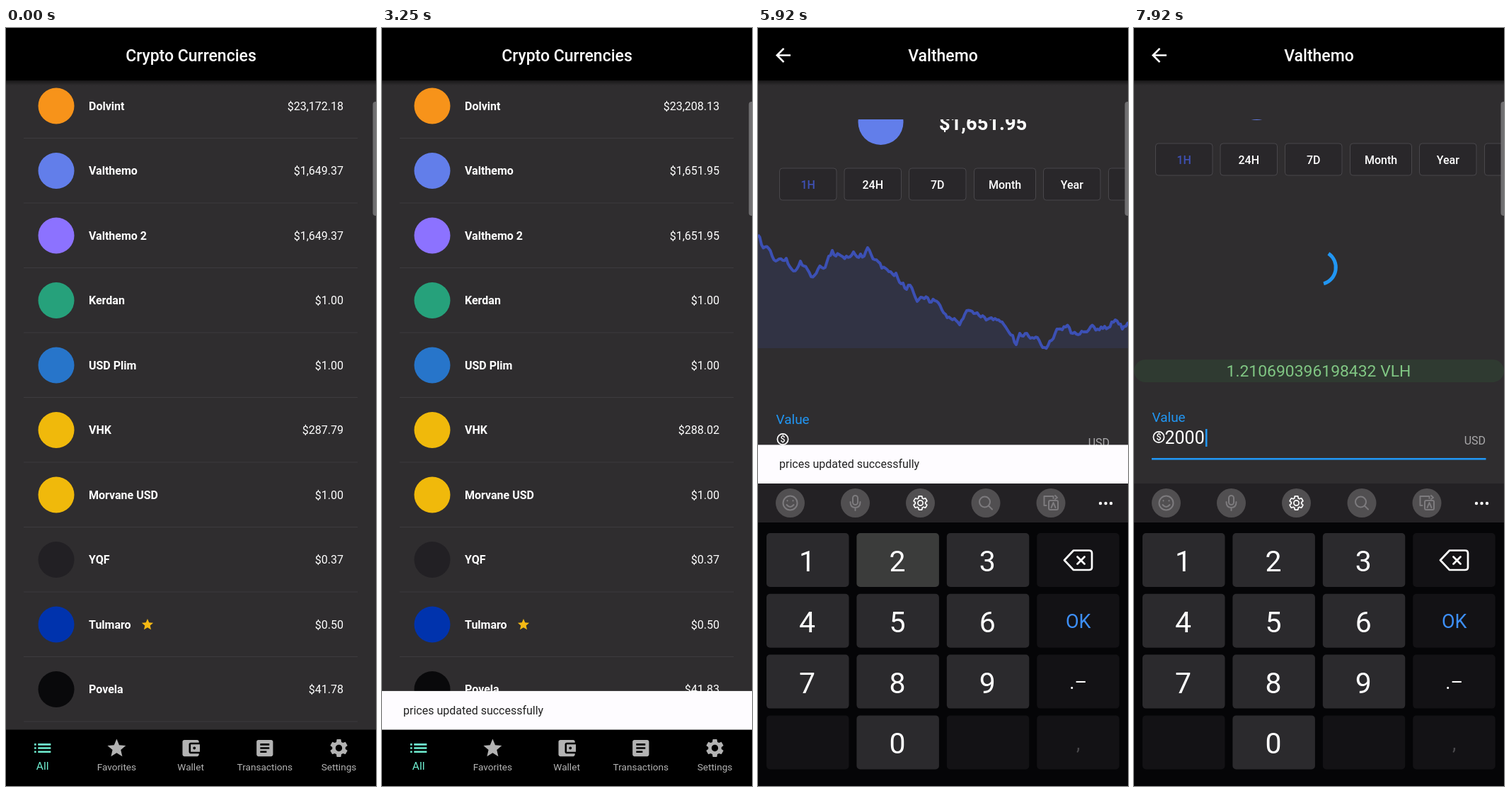
Recreate the animation shown at these times as an HTML page. Size 523 by 1070 pixels, loop 8000 ms.

```html
<!DOCTYPE html>
<html lang="en">
<head>
<meta charset="utf-8">
<title>Crypto Currencies</title>
<style>
html, body { margin: 0; width: 100%; height: 100%; overflow: hidden; background: #000; }
svg { display: block; }
#stage { width: 523px; height: 1070px; font-family: Roboto, sans-serif; }
.line { fill: none; stroke-width: 2; stroke-linecap: round; stroke-linejoin: round; }
</style>
</head>
<body>
<svg id="stage" viewBox="0 0 523 1070"></svg>
<script>
const LOOP = 8000;
const BG = '#2f2d2f', BLUE = '#2196f3';
const stage = document.getElementById('stage');

const coins = [
  ['Dolvint', '#f7931a', '$23,172.18', '$23,208.13'],
  ['Valthemo', '#627eea', '$1,649.37', '$1,651.95'],
  ['Valthemo 2', '#8c72ff', '$1,649.37', '$1,651.95'],
  ['Kerdan', '#26a17b', '$1.00', '$1.00'],
  ['USD Plim', '#2775ca', '$1.00', '$1.00'],
  ['VHK', '#f0b90b', '$287.79', '$288.02'],
  ['Morvane USD', '#f0b90b', '$1.00', '$1.00'],
  ['YQF', '#222024', '$0.37', '$0.37'],
  ['Tulmaro', '#0033ad', '$0.50', '$0.50'],
  ['Povela', '#09090b', '$41.78', '$41.83']
];

const icons = {
  list: 'M3 13h2v-2H3zm0 4h2v-2H3zm0-8h2V7H3zm4 4h14v-2H7zm0 4h14v-2H7zM7 7v2h14V7z',
  star: 'M12 17.27L18.18 21l-1.64-7.03L22 9.24l-7.19-.61L12 2 9.19 8.63 2 9.24l5.46 4.73L5.82 21z',
  wallet: 'M21 18v1c0 1.1-.9 2-2 2H5c-1.11 0-2-.9-2-2V5c0-1.1.89-2 2-2h14c1.1 0 2 .9 2 2v1h-9c-1.11 0-2 .9-2 2v8c0 1.1.89 2 2 2h9zm-9-2h10V8H12v8zm4-2.5c-.83 0-1.5-.67-1.5-1.5s.67-1.5 1.5-1.5 1.5.67 1.5 1.5-.67 1.5-1.5 1.5z',
  article: 'M19 3H5c-1.1 0-2 .9-2 2v14c0 1.1.9 2 2 2h14c1.1 0 2-.9 2-2V5c0-1.1-.9-2-2-2zm-5 14H7v-2h7v2zm3-4H7v-2h10v2zm0-4H7V7h10v2z',
  gear: 'M19.14 12.94c.04-.3.06-.61.06-.94 0-.32-.02-.64-.07-.94l2.03-1.58c.18-.14.23-.41.12-.61l-1.92-3.32c-.12-.22-.37-.29-.59-.22l-2.39.96c-.5-.38-1.03-.7-1.62-.94l-.36-2.54c-.04-.24-.24-.41-.48-.41h-3.84c-.24 0-.43.17-.47.41l-.36 2.54c-.59.24-1.13.57-1.62.94l-2.39-.96c-.22-.08-.47 0-.59.22L2.74 8.87c-.12.21-.08.47.12.61l2.03 1.58c-.05.3-.09.63-.09.94s.02.64.07.94l-2.03 1.58c-.18.14-.23.41-.12.61l1.92 3.32c.12.22.37.29.59.22l2.39-.96c.5.38 1.03.7 1.62.94l.36 2.54c.05.24.24.41.48.41h3.84c.24 0 .44-.17.47-.41l.36-2.54c.59-.24 1.13-.56 1.62-.94l2.39.96c.22.08.47 0 .59-.22l1.92-3.32c.12-.22.07-.47-.12-.61zM12 15.6c-1.98 0-3.6-1.62-3.6-3.6s1.62-3.6 3.6-3.6 3.6 1.62 3.6 3.6-1.62 3.6-3.6 3.6z',
  back: 'M20 11H7.83l5.59-5.59L12 4l-8 8 8 8 1.41-1.41L7.83 13H20z',
  check: 'M9 16.17L4.83 12l-1.42 1.41L9 19 21 7l-1.41-1.41z'
};

const text = (x, y, size, str, extra = '') =>
  `<text x="${x}" y="${y}" font-size="${size}" fill="#fff" ${extra}>${str}</text>`;
const rect = (x, y, w, h, fill, extra = '') =>
  `<rect x="${x}" y="${y}" width="${w}" height="${h}" fill="${fill}" ${extra}/>`;
const circle = (x, y, r, fill, extra = '') =>
  `<circle cx="${x}" cy="${y}" r="${r}" fill="${fill}" ${extra}/>`;
const icon = (name, x, y, size, fill, extra = '') =>
  `<path d="${icons[name]}" fill="${fill}" transform="translate(${x} ${y}) scale(${size / 24}) translate(-12 -12)" ${extra}/>`;
const MID = 'text-anchor="middle"', END = 'text-anchor="end"';

const header = title => rect(0, 74, 523, 7, 'url(#shade)') + rect(0, 0, 523, 74, '#000') +
  text(261.5, 47, 23, title, MID + ' font-weight="500"');

function listScreen() {
  const rows = coins.map(([name, color], i) => {
    const y = 110 + 91.5 * i;
    return circle(71, y, 25.5, color) + text(117, y + 5.5, 16, name, 'font-weight="700"') +
      text(477, y + 5.5, 16, '', END + ' class="price"') +
      rect(25, y + 45, 472, 1, '#3d3b3e');
  }).join('');
  const tabs = [['list', 'All'], ['star', 'Favorites'], ['wallet', 'Wallet'],
    ['article', 'Transactions'], ['gear', 'Settings']];
  const nav = tabs.map(([name, label], i) => {
    const x = 51.7 + 104.7 * i, color = i ? '#b3b3b3' : '#70f0d2';
    return icon(name, x, 1016.5, 31, color) +
      `<text x="${x}" y="${i ? 1047.5 : 1047}" font-size="${i ? 13.6 : 15.5}" fill="${color}" ${MID}>${label}</text>`;
  }).join('');
  return rect(0, 0, 523, 1070, BG) + rows + icon('star', 200, 842, 19.5, '#f5b914') +
    rect(25, 156, 472, 91, '#fff', 'id="ripple" opacity="0"') +
    `<g id="refresh">${circle(0, 0, 26.5, BG, 'filter="url(#soft)"')}
      <path id="refreshArc" fill="none" stroke="${BLUE}" stroke-width="3.4"/>
      <path id="refreshHead" d="M-6.5 0H6.5L0-8Z" fill="${BLUE}"/></g>` +
    header('Crypto Currencies') + `<g id="nav">${rect(0, 990.5, 523, 80, '#000')}${nav}</g>`;
}

// Price curve: one height every 5 px, with a small seeded jitter in between.
const heights = [320,334,337,339,350,357,354,356,353,365,371,368,357,364,369,379,377,368,366,366,350,
  342,350,348,351,350,351,344,351,347,350,338,348,355,358,367,367,372,375,374,387,388,397,391,402,414,
  408,410,409,415,413,416,426,432,436,440,441,447,438,427,427,431,430,436,436,439,437,438,440,443,450,
  458,462,475,459,463,459,466,466,465,475,479,476,469,459,453,454,450,451,459,460,460,457,457,450,450,
  453,450,449,451,443,440,446,453,449,446];
function chart() {
  let seed = 7;
  const jitter = () => ((seed = seed * 16807 % 2147483647) / 2147483647 - 0.5) * 7;
  const points = heights.flatMap((h, i) => {
    const next = heights[i + 1] ?? h;
    return [`${i * 5} ${h}`, `${i * 5 + 2.5} ${((h + next) / 2 + jitter()).toFixed(1)}`];
  }).join('L');
  return `<g id="chart"><path d="M${points}V480H0Z" fill="#3f51b5" fill-opacity=".16"/>
    <path d="M${points}" fill="none" stroke="#3c50b4" stroke-width="4" stroke-linejoin="round"/></g>`;
}

function detailScreen() {
  const chips = [[30.5, 80.5, '1H'], [122, 80.5, '24H'], [213.5, 80.5, '7D'], [305.5, 87, 'Month'],
    [403.5, 80.5, 'Year'], [495.5, 80, '']].map(([x, w, label], i) =>
    rect(x, 226, w, 45, '#29272a', 'rx="4" stroke="#49474b"') +
    `<text x="${x + w / 2}" y="254.5" font-size="16" font-weight="500" fill="${i ? '#fff' : '#3f51b5'}" ${MID}>${label}</text>`).join('');
  return rect(0, 0, 523, 1070, BG) + `<g clip-path="url(#body)"><g id="scroll">
    ${circle(173.5, 161, 32, '#627eea')}
    ${text(256, 171.5, 27.3, '$1,651.95', 'font-weight="700"')}
    ${chips}${chart()}
    <path id="spinner" transform="translate(261.5 401)" fill="none" stroke="${BLUE}" stroke-width="5"/>
    <g id="amount">${rect(0, 531, 523, 32, '#2f3a31', 'rx="16"')}
      <text id="amountText" x="261" y="555" font-size="22.9" fill="#81c784" ${MID}></text></g>
    <g id="form">
      <text id="label" x="25.5">Value</text>
      <g id="affix">${circle(35, 608.5, 7.6, 'none', 'stroke="#fff" stroke-width="1.7"')}
        ${text(35, 613, 12.5, '$', MID + ' font-weight="500"')}
        <text x="497" y="618.5" font-size="16" fill="#a8a7a9" ${END}>USD</text></g>
      <text id="value" x="43.5" y="618" font-size="25" fill="#fff"></text>
      ${rect(44, 597, 2.6, 25, BLUE, 'id="caret"')}
      <rect id="underline" x="25" width="472.5"/>
      ${rect(25, 703, 472.5, 65, '#1e97f5', 'rx="4" filter="url(#soft)"')}
      ${icon('check', 238, 736, 29, '#fff')}
      ${text(260.5, 743.5, 22.5, 'Buy', 'font-weight="500"')}
    </g></g></g>` + header('Valthemo') + icon('back', 35.5, 38.5, 31.5, '#fff') + '<use href="#nav"/>';
}

function keyboard() {
  const labels = ['1', '2', '3', '', '4', '5', '6', 'OK', '7', '8', '9', '.–', '', '0', '', ','];
  const keys = labels.map((label, i) => {
    const x = 12 + 127.4 * (i % 4), y = 713 + 85.8 * (i >> 2), digit = /\d/.test(label);
    const key = rect(x, y, 116.5, 76, digit ? '#2b2a2d' : '#131215', 'rx="5"' + (digit ? ` id="key${label}"` : ''));
    if (digit) return key + text(x + 57.5, y + 54, 41, label, MID);
    const color = label === 'OK' ? '#3d8ff7' : label === ',' ? '#4a494c' : '#fff';
    return key + `<text x="${x + 58.5}" y="${y + 48.5}" font-size="27" fill="${color}" ${MID}>${label}</text>`;
  }).join('');
  const dots = [484, 491.5, 499].map(x => circle(x, 671, 2.2, '#fff')).join('');
  const discs = [45.5, 137.5, 229.5, 322, 414].map(x => circle(x, 670.5, 20.5, '#514f51')).join('');
  return rect(0, 643, 523, 56, '#232124') + rect(0, 698, 523, 372, '#050507') + discs + dots +
    `<g class="line" stroke="#7d7b7e">
      <circle cx="45.5" cy="670.5" r="10"/><path d="M41.5 667v.5M49.5 667v.5M40.5 673q5 6 10 0"/>
      <rect x="134" y="660" width="7" height="13" rx="3.5"/><path d="M130.5 669q0 8 7 8t7-8M137.5 677v4"/>
      <circle cx="320.5" cy="669" r="7.5"/><path d="M326 674.5l5 5"/>
      <rect x="411" y="667" width="13" height="13" rx="2"/><path d="M414.5 677l3-7 3 7M407.5 674h-3v-13h13v3M420 660l3 3-3 2"/>
    </g>` + icon('gear', 229.5, 670.5, 24, 'none', 'stroke="#fff" stroke-width="1.7"') + keys +
    `<path class="line" stroke="#fff" style="stroke-width:2.7" d="M446 737.5H468q4 0 4 4V761q0 4-4 4H446L433 751.3ZM451.5 746.5l10 10m0-10l-10 10"/>`;
}

stage.innerHTML = `<defs>
  <linearGradient id="shade" x2="0" y2="1"><stop stop-opacity=".5"/><stop offset="1" stop-opacity="0"/></linearGradient>
  <filter id="soft" x="-20%" y="-20%" width="140%" height="150%"><feDropShadow dx="0" dy="2" stdDeviation="2" flood-opacity=".4"/></filter>
  <clipPath id="body"><rect y="129" width="523" height="941"/></clipPath></defs>
  <g id="list">${listScreen()}</g><g id="detail">${detailScreen()}</g>
  <svg id="snack" width="523">${rect(0, 0, 523, 56, '#fefcff')}
    <text x="30" y="33" font-size="16" fill="#222">prices updated successfully</text></svg>
  <g id="keyboard">${keyboard()}</g>${rect(518.5, 104, 10, 161, '#706f71', 'rx="4"')}`;

const el = Object.fromEntries([...stage.querySelectorAll('[id]')].map(n => [n.id, n]));
const prices = [...stage.querySelectorAll('.price')];
const set = (node, attrs) => { for (const k in attrs) node.setAttribute(k, attrs[k]); };
const show = (node, on) => set(node, { display: on ? 'inline' : 'none' });
const ramp = (t, start, length) => Math.min(1, Math.max(0, (t - start) / length));

// cubic-bezier(.4, 0, .2, 1)
function ease(x) {
  let lo = 0, hi = 1;
  for (let i = 0; i < 18; i++) {
    const u = (lo + hi) / 2, v = 1 - u;
    if (1.2 * u * v * v + 0.6 * u * u * v + u ** 3 < x) lo = u; else hi = u;
  }
  return 3 * lo * lo - 2 * lo ** 3;
}

function arc(r, start, sweep) {
  const at = deg => [Math.cos(deg * Math.PI / 180) * r, Math.sin(deg * Math.PI / 180) * r].map(n => n.toFixed(2)).join(' ');
  return `M${at(start)}A${r} ${r} 0 ${sweep > 180 ? 1 : 0} 1 ${at(start + sweep)}`;
}
function spin(r, elapsed, turn) {
  const phase = elapsed / 1333 % 1;
  const head = ease(Math.min(1, phase * 2)), tail = ease(Math.max(0, phase * 2 - 1));
  return arc(r, turn - 90 + tail * 270 + elapsed / 2222 * 360 + phase * 90, Math.max(2, (head - tail) * 270));
}

function drawRefresh(t) {
  show(el.refresh, t >= 950 && t < 2870);
  const pull = 1.46 * ramp(t, 950, 220) - 0.46 * ease(ramp(t, 1250, 150));
  const scale = 1 - ramp(t, 2670, 200), dragging = t < 1330;
  set(el.refresh, { transform: `translate(261.5 ${42 + 117 * pull}) scale(${scale})` });
  const start = 160 + (pull - 1.46) * 200, sweep = 285 * Math.min(1, pull);
  set(el.refreshArc, { d: dragging ? arc(11.5, start, sweep) : spin(11.5, t - 1000, 0) });
  show(el.refreshHead, dragging);
  set(el.refreshHead, { transform: `rotate(${start}) translate(11.5 0)` });
}

const typed = [[0, ''], [6000, '2'], [6600, '20'], [7420, '200'], [7500, '2000']];
const presses = [['2', 5860, 6000], ['0', 6480, 6600], ['0', 7120, 7200], ['0', 7260, 7330]];
const zoom = s => `translate(261.5 535) scale(${s}) translate(-261.5 -535)`;

function drawDetail(t) {
  const enter = ramp(t, 4170, 300);
  show(el.list, enter < 1);
  show(el.detail, enter > 0);
  set(el.list, { transform: zoom(1 + 0.05 * ease(enter)) });
  set(el.detail, { transform: zoom(0.85 + 0.15 * ease(enter)), opacity: ramp(enter, 0.1, 0.25) });

  const loading = t < 4920 || t >= 7250;
  show(el.chart, !loading);
  show(el.spinner, loading);
  set(el.spinner, { d: t < 5000 ? spin(23.8, Math.max(0, Math.min(t, 4750) - 4170), 0) : spin(23.8, t - 6360, 126) });

  const [typedAt, value] = typed.findLast(([at]) => t >= at);
  const focus = ease(ramp(t, 5220, 200)), focused = t >= 5220;
  const scroll = 28 * ease(ramp(t, 5520, 100)) + 35 * ease(ramp(t, 6000, 100));
  set(el.scroll, { transform: `translate(0 ${-scroll})` });
  set(el.form, { transform: `translate(0 ${value ? 32 : 0})` });
  show(el.amount, value);
  el.amountText.textContent = value ? `${value / 1651.95} VLH` : '';
  el.value.textContent = value;
  set(el.label, { y: 617 - 30 * focus, 'font-size': 25 - 6 * focus, fill: focused ? BLUE : '#a8a7a9' });
  set(el.affix, { opacity: focus });
  set(el.underline, focused ? { y: 638, height: 2.6, fill: BLUE } : { y: 639, height: 1.2, fill: '#a8a7a9' });
  const blinkFrom = value ? typedAt : 5220;
  show(el.caret, focused && (t - blinkFrom) % 1000 < 500);
  set(el.caret, { x: 44 + 14.04 * value.length + (value ? 0.8 : 0) });

  const rise = ease(ramp(t, 5250, 270));
  show(el.keyboard, rise > 0);
  set(el.keyboard, { transform: `translate(0 ${427 * (1 - rise)})` });
  for (const digit of '20') {
    const down = presses.some(([key, from, to]) => key === digit && t >= from && t < to);
    set(el['key' + digit], { fill: down ? '#3b3c3b' : '#2b2a2d' });
  }
}

function drawSnack(t) {
  const height = 54.8 * ease(Math.min(ramp(t, 2750, 250), 1 - ramp(t, 7000, 250)));
  const bottom = t < 5520 ? 990.5 : 643;
  show(el.snack, height > 0);
  set(el.snack, { y: bottom - height, height });
}

function draw(t) {
  prices.forEach((node, i) => { node.textContent = coins[i][t < 2670 ? 2 : 3]; });
  set(el.ripple, { opacity: 0.1 * ramp(t, 3960, 200) });
  drawRefresh(t);
  drawDetail(t);
  drawSnack(t);
}

const begin = performance.now();
function tick() {
  draw((performance.now() - begin) % LOOP);
  requestAnimationFrame(tick);
}
tick();
</script>
</body>
</html>
```
